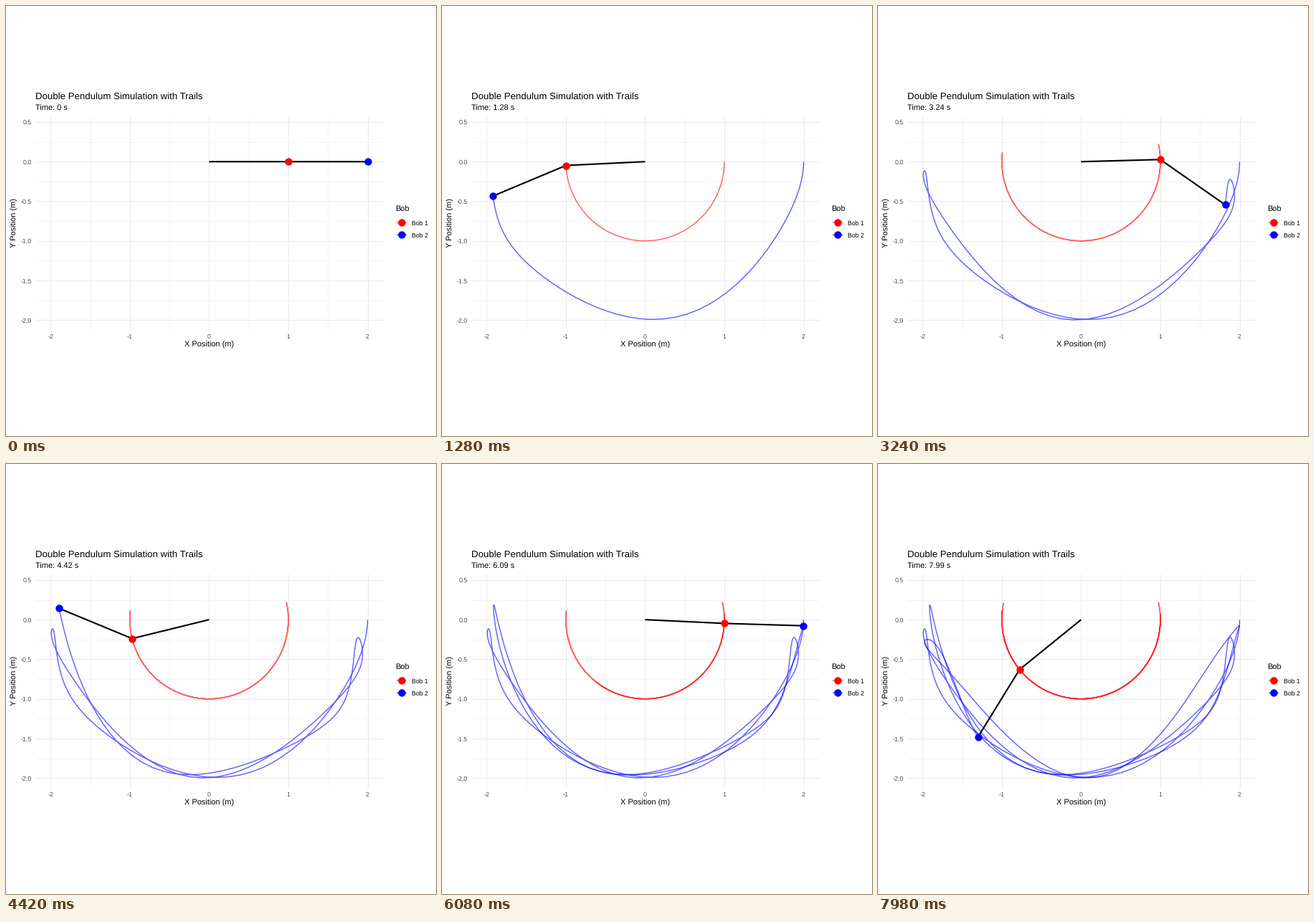
These frames come from a looping animation (600 by 600 pixels, 8000 ms). A matplotlib script:

```python
import matplotlib.pyplot as plt
import numpy as np
from matplotlib.animation import FuncAnimation
from matplotlib.collections import LineCollection

plt.rcParams["font.family"] = "Liberation Sans"
plt.rcParams["text.hinting"] = "none"
plt.rcParams["path.simplify"] = False

SIZE, DPI = 600, 100
FRAMES, INTERVAL = 400, 20
DT, SUBSTEPS = 0.02, 8         # motion per frame and solver steps within it
CLOCK_DT = 20 / 999            # the clock spreads 20 s over 1000 readings
CHUNK = 250                    # samples per stroked piece of a trail
G = 9.81

SCALE, X0, Y0 = 110.55, 283.4, 217.2
LEFT, RIGHT, TOP, BOTTOM = 40.9, 526.7, 153.6, 451.6
COLORS = ("#FF0000", "#0000FF")


def pt(px):
    """Pixels to points."""
    return px * 72 / DPI


def sx(x):
    return X0 + SCALE * x


def sy(y):
    return Y0 - SCALE * y


# --- physics: two unit masses on two unit rods ---

def deriv(s):
    a, b, wa, wb = s
    d = a - b
    sin, cos = np.sin(d), np.cos(d)
    den = 3 - np.cos(2 * d)
    acc_a = (-3 * G * np.sin(a) - G * np.sin(a - 2 * b)
             - 2 * sin * (wb * wb + wa * wa * cos)) / den
    acc_b = 2 * sin * (2 * wa * wa + 2 * G * np.cos(a) + wb * wb * cos) / den
    return np.array([wa, wb, acc_a, acc_b])


def rk4(s, h):
    k1 = deriv(s)
    k2 = deriv(s + h / 2 * k1)
    k3 = deriv(s + h / 2 * k2)
    k4 = deriv(s + h * k3)
    return s + h / 6 * (k1 + 2 * k2 + 2 * k3 + k4)


def simulate(count):
    s = np.array([np.pi / 2, np.pi / 2, 0.0, 0.0])
    angles = [s[:2]]
    for _ in range(count - 1):
        for _ in range(SUBSTEPS):
            s = rk4(s, DT / SUBSTEPS)
        angles.append(s[:2])
    a, b = np.array(angles).T
    bob1 = np.column_stack([np.sin(a), -np.cos(a)])
    bob2 = bob1 + np.column_stack([np.sin(b), -np.cos(b)])
    return [np.column_stack([sx(p[:, 0]), sy(p[:, 1])]) for p in (bob1, bob2)]


tracks = simulate(FRAMES)

# --- stage ---

fig = plt.figure(figsize=(SIZE / DPI, SIZE / DPI), dpi=DPI, facecolor="white")
ax = fig.add_axes([0, 0, 1, 1])
ax.set_xlim(0, SIZE)
ax.set_ylim(SIZE, 0)
ax.axis("off")


def label(x, y, s, size=11.0, color="black", ha="left", **kw):
    return ax.text(x, y, s, fontsize=pt(size), color=color, ha=ha,
                   va="baseline", **kw)


def grid(xs, ys, width):
    segs = [[(sx(x), TOP), (sx(x), BOTTOM)] for x in xs]
    segs += [[(LEFT, sy(y)), (RIGHT, sy(y))] for y in ys]
    ax.add_collection(LineCollection(segs, colors="#EBEBEB",
                                     linewidths=pt(width), zorder=1),
                      autolim=False)


def line(width, color, z, alpha=1.0):
    return ax.plot([], [], color=color, lw=pt(width), alpha=alpha, zorder=z,
                   solid_capstyle="butt", solid_joinstyle="round",
                   snap=False)[0]


def dot(color):
    return ax.plot([], [], "o", color=color, ms=pt(10.4), mew=0, zorder=5,
                   snap=False)[0]


x_ticks = np.arange(-2, 3)
y_ticks = np.arange(-2, 0.75, 0.5)
grid(x_ticks[:-1] + 0.5, y_ticks[:-1] + 0.25, 0.53)
grid(x_ticks, y_ticks, 1.07)

for x in x_ticks:
    label(sx(x), 464, f"{x}", 8.8, "#4D4D4D", "center")
for y in y_ticks:
    label(35.9, sy(y) + 3.4, f"{y:.1f}", 8.8, "#4D4D4D", "right")

label(LEFT, 130, "Double Pendulum Simulation with Trails", 13.2)
clock = label(LEFT, 146, "")
label((LEFT + RIGHT) / 2, 476, "X Position (m)", ha="center")
label(14.6, (TOP + BOTTOM) / 2, "Y Position (m)", ha="center",
      rotation=90, rotation_mode="anchor")

# --- legend ---

label(543.3, 287, "Bob")
for i, color in enumerate(COLORS):
    y = 302 + 17.28 * i
    line(1.49, color, 2, 0.6).set_data([545, 558.8], [y, y])
    dot(color).set_data([551.9], [y])
    label(566.1, y + 3.8, f"Bob {i + 1}", 8.8)

# --- moving parts ---

trails = [[line(1.49, c, 2 + i, 0.6) for _ in range(2)]
          for i, c in enumerate(COLORS)]
rods = [line(2.13, "black", 4) for _ in range(2)]
bobs = [dot(c) for c in COLORS]


def update(i):
    joint = np.array([X0, Y0])
    for track, trail, rod, bob in zip(tracks, trails, rods, bobs):
        path, pos = track[:i + 1], track[i]
        trail[0].set_data(*path[:CHUNK].T)
        trail[1].set_data(*path[CHUNK - 1:].T)
        rod.set_data(*np.array([joint, pos]).T)
        bob.set_data(*pos[:, None])
        joint = pos
    clock.set_text(f"Time: {round(i * CLOCK_DT, 2):g} s")
    return [*trails[0], *trails[1], *rods, *bobs, clock]


anim = FuncAnimation(fig, update, frames=FRAMES, interval=INTERVAL,
                     repeat=True, repeat_delay=0, cache_frame_data=False)
plt.show()
```
